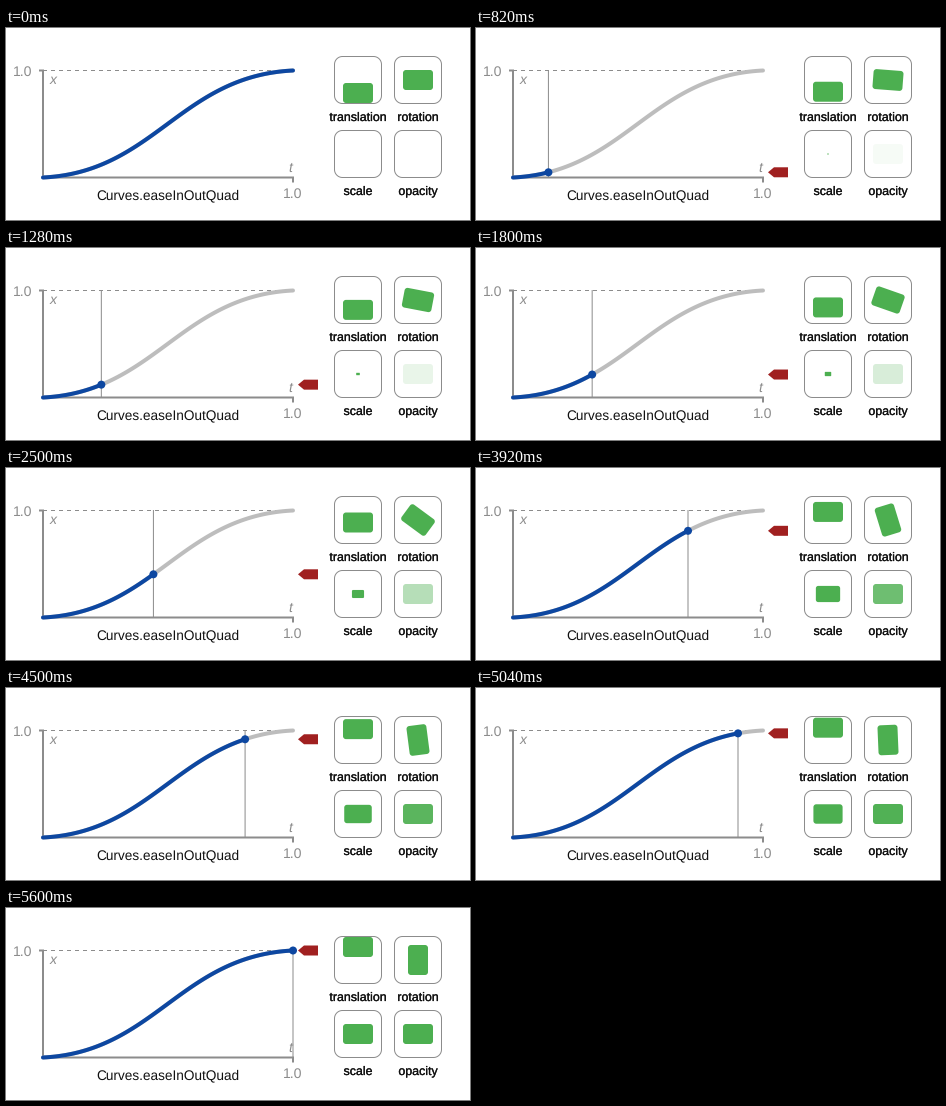
A matplotlib script that plays this animation: 464x192 px, repeating every 5620 ms.

```python
import numpy as np
import matplotlib.pyplot as plt
from matplotlib import patheffects
from matplotlib.animation import FuncAnimation
from matplotlib.patches import Circle, Polygon
from matplotlib.transforms import Affine2D

W, H, DPI = 464, 192, 64
PX = 72 / DPI  # points per pixel
STEPS = 120
BLUE, GREEN, RED = "#0D47A1", "#4CAF50", "#A02020"
AXIS, PALE, INK = "#8C8C8C", "#BDBDBD", "#111111"
X0, X1, Y0, Y1 = 37, 287, 149.5, 42.5

plt.rcParams.update({
    "font.family": "Liberation Sans",
    "text.hinting": "none",
    "toolbar": "None",
})

fig = plt.figure(figsize=(W / DPI, H / DPI), dpi=DPI, facecolor="white")
ax = fig.add_axes([0, 0, 1, 1])
ax.set(xlim=(0, W), ylim=(H, 0))
ax.axis("off")


def bezier(s, a, b):
    return 3 * a * s * (1 - s) ** 2 + 3 * b * s ** 2 * (1 - s) + s ** 3


def curve_points(s):
    t, v = bezier(s, 0.445, 0.55), bezier(s, 0.05, 0.95)
    return X0 + t * (X1 - X0), Y0 + v * (Y1 - Y0)


S = np.linspace(0, 1, 1001)
T = bezier(S, 0.445, 0.55)


def line(xs, ys, color, width, z, **kw):
    return ax.plot(xs, ys, color=color, lw=width * PX, zorder=z,
                   snap=False, **kw)[0]


def label(x, y, text, size, color, ha="center", **kw):
    return ax.text(x, y, text, fontsize=size * PX, color=color,
                   ha=ha, va="baseline", zorder=3, **kw)


def rounded(cx, cy, w, h, r, **kw):
    a = (np.arange(64) + 0.5) * np.pi / 32
    x = cx + r * np.cos(a) + (w / 2 - r) * np.sign(np.cos(a))
    y = cy + r * np.sin(a) + (h / 2 - r) * np.sign(np.sin(a))
    return ax.add_patch(Polygon(np.column_stack([x, y]), **kw))


# Chart
line([X0, X1], [Y1, Y1], AXIS, 1, 1, ls=(0, (4, 4)), dash_capstyle="butt")
line([X0 - 4, X0, X0, X1, X1], [Y1, Y1, Y0, Y0, Y0 + 5], AXIS, 2, 1,
     solid_capstyle="butt", solid_joinstyle="miter")
label(26.5, 47.7, "1.0", 14, AXIS, ha="right")
label(X1, 169.7, "1.0", 14, AXIS)
label(47, 56, "x", 14, AXIS, style="italic")
label(284, 144, "t", 14, AXIS, style="italic")
label(161.7, 171.3, "Curves.easeInOutQuad", 13.6, INK)

line(*curve_points(S[::10]), PALE, 4, 4, solid_capstyle="round")
done = line([], [], BLUE, 4, 5, solid_capstyle="round")
guide = line([X0, X0], [Y1, Y0], AXIS, 1, 2)
dot = ax.add_patch(Circle((X0, Y0), 4, fc=BLUE, lw=0, zorder=6))
arrow = ax.add_patch(Polygon([(0, 0), (1, 1)], fc=RED, lw=0, zorder=6))


# Sample tiles
def tile(cx, cy, name):
    rounded(cx, cy, 47, 47, 8, fc="white", ec=AXIS, lw=PX, zorder=1)
    text = label(cx, cy + 41, name, 12.4, INK)
    text.set_path_effects([patheffects.withStroke(linewidth=0.25 * PX,
                                                  foreground=INK)])
    return rounded(0, 0, 30, 20, 3, fc=GREEN, lw=0, zorder=2)


def place(patch, cx, cy, scale=1.0, angle=0.0):
    move = Affine2D().scale(scale).rotate_deg(angle).translate(cx, cy)
    patch.set_transform(move + ax.transData)


shift = tile(352, 52, "translation")
turn = tile(412, 52, "rotation")
grow = tile(352, 126, "scale")
fade = tile(412, 126, "opacity")
place(fade, 412, 126)


def update(i):
    # Uneven steps: 20, 100 and 20 ms in turn
    m, r = divmod(i, 7)
    k = 3 * m + (r >= 1) + (r >= 6)
    s = np.interp(k / STEPS, T, S)
    x, y = curve_points(s)
    v = (y - Y0) / (Y1 - Y0)

    done.set_data(*curve_points(np.linspace(0, s if k else 1, 100)))
    guide.set_xdata([x, x])
    dot.center = (x, y)
    arrow.set_xy([(292, y), (298, y - 5), (312, y - 5),
                  (312, y + 5), (298, y + 5)])
    for part in (guide, dot, arrow, grow):
        part.set_visible(k > 0)

    place(shift, 352, 65 - 26 * v)
    place(turn, 412, 52, angle=90 * v)
    place(grow, 352, 126, scale=max(v, 1e-3))
    fade.set_alpha(float(np.clip(v, 0, 1)))
    return done, guide, dot, arrow, shift, turn, grow, fade


anim = FuncAnimation(fig, update, frames=281, interval=20, repeat=True,
                     repeat_delay=0, blit=False)
plt.show()
```
